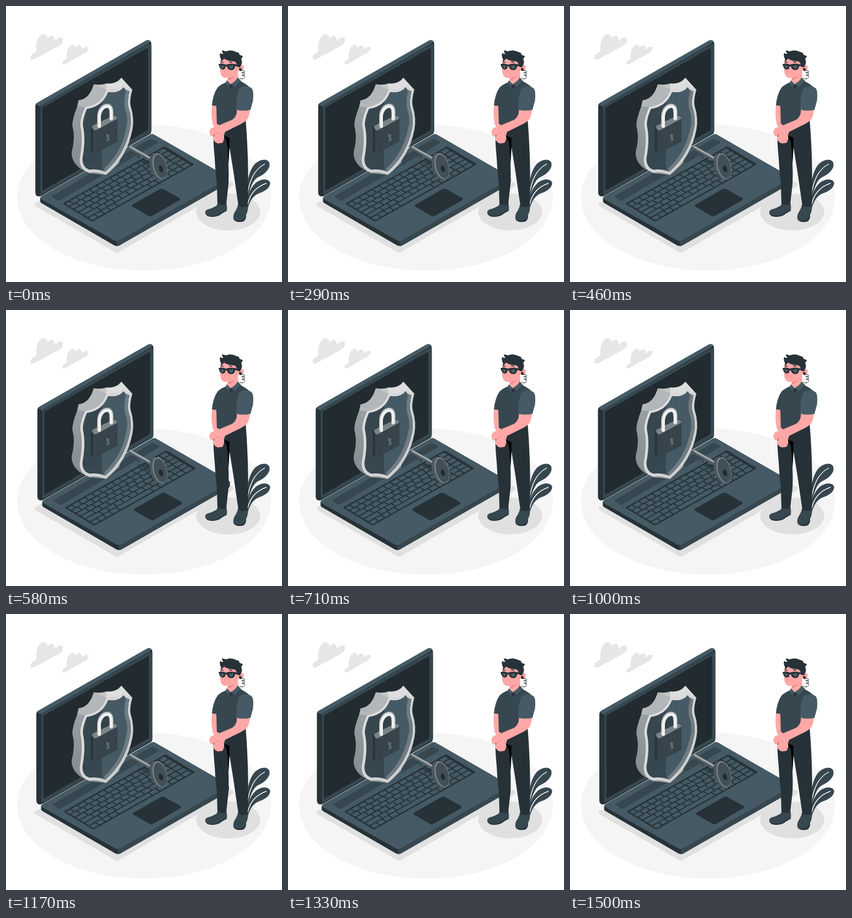
An HTML page that plays this animation: 500x500 px, repeating every 1540 ms.

```html
<!DOCTYPE html>
<html lang="en">
<head>
<meta charset="utf-8">
<title>Laptop security</title>
<style>
html, body { margin: 0; width: 100%; height: 100%; overflow: hidden; background: #fff; }
svg { display: block; width: 100vw; height: 100vh; }
</style>
</head>
<body>
<svg viewBox="0 0 500 500" xmlns="http://www.w3.org/2000/svg">
  <defs>
    <linearGradient id="side" x1="0" y1="0" x2="0" y2="1">
      <stop offset="0" stop-color="#a3a8ab"/><stop offset="1" stop-color="#83898c"/>
    </linearGradient>
    <linearGradient id="rim" x1="0" y1="0" x2="1" y2="1">
      <stop offset="0" stop-color="#e3e3e3"/><stop offset="1" stop-color="#c6c8c9"/>
    </linearGradient>
    <clipPath id="panel"><use href="#inner"/></clipPath>
  </defs>

  <ellipse cx="250" cy="347" rx="230" ry="132.500" fill="#f5f5f5"/>
  <g fill="#e6e6e6">
    <path d="M47 97C43 96 44 89 49 86C53 83 55 84 55 79C54 69 56 59 63 53C69 49 75 51 75 59C79 53 85 52 87 57C89 60 88 62 89 63C94 57 101 54 103 59C104 64 101 69 96 72L52 96Q49 98 47 97Z"/>
    <path d="M104 106C101 105 102 100 106 98C109 96 110 96 110 92C109 84 112 75 118 71C122 69 126 71 126 76C129 71 134 70 136 73C137 75 137 77 137 79C142 74 149 72 150 76C150 80 147 83 143 85L108 105Q106 106 104 106Z"/>
  </g>
  <path d="M53 357Q50 360 54 363L196 445Q201 448 206 445L410 327Q415 323 410 320L263 250Z" fill="#e0e0e0"/>
  <ellipse cx="402.500" cy="373" rx="58" ry="33.500" fill="#e0e0e0"/>

  <g id="laptop">
    <path d="M62 348V353Q62 356 66 358L196 433.500Q201 436 206 433.500L399 323Q402 321 402 318V311Z" fill="#263238"/>
    <path d="M201 425V435Q204 435 206 433.500L399 323Q402 321 402 318V311Z" fill="#37474f"/>
    <path d="M64 350Q60 347 65 344L261 233Q265 231 269 233.200L399 308Q404 311.500 399 314L205 424.500Q201 427 196 424.500Z" fill="#455a64"/>
    <path d="M82 345L93 352.500Q95 353.500 98 352L273 249Q276 247 273 245L262 240.500Z" fill="#37474f"/>
    <path d="M53.300 182Q53.300 177 57 175.200L253 63.200Q259 60 262.500 64.500Q263.500 66 263.500 69V226Q263.500 230 261 232L64 344Q59 346 56 344Q53.300 342 53.300 338Z" fill="#263238"/>
    <path d="M54.800 177.700Q55 176 57 175.200L253 63.200Q259 60 262.500 64.500L257.500 68.200L64 179.700Q62.500 180.500 62.500 183Z" fill="#455a64"/>
    <path d="M62.500 185Q62.500 181 66 179L257 70Q263 67 263.500 72V225Q263.500 228 261 230L66 341Q62.500 343 62.500 339Z" fill="#37474f"/>
    <path d="M66 187Q66 184 68 183L254.500 77Q257.500 75.500 257.500 79V221Q257.500 224 255 226L68 333.500Q66 334.500 66 332Z" fill="#222b30"/>
    <g id="keys" transform="matrix(.867 -.488 .85 .515 102.500 358)">
      <rect width="213" height="63.500" rx="2" fill="#263238"/>
    </g>
    <path d="M230 359.500L278 332Q282 330 286 332L314 347.500Q317 350 314 352L266 379.500Q262 382 258 380L230 364Q226 362 230 359.500Z" fill="#263238"/>
  </g>

  <!-- shield -->
  <path d="M129 182Q131 177 131.500 171Q151 169 159 142Q171 144 182 140.500Q200 142 209 130L228 151L205 285L181 306L151 303L134 294Q118 282 119 264Q126 238 120.500 219Q119 208 129 182Z" fill="url(#side)"/>
  <path d="M131.500 171Q151 169 159 142L182 151.500Q173 179 143.500 183L129 182Z" fill="#b3b7b9"/>
  <path d="M159 142Q171 144 182 140.500L205 149Q193 153 182 151.500Z" fill="#c4c7c8"/>
  <path d="M182 140.500Q200 142 209 130L228 151L214 146Q203 153 182 151.500Z" fill="#dedede"/>
  <path d="M143.500 183Q173 179 182 151.500Q203 155 213 141.500Q218 149 229 151Q223 172 226 182Q233 204 229 224Q219 275 181 306Q165 300 151 302Q133 297 133.500 277Q140 241 135 218Q133 207 143.500 183Z" fill="url(#rim)"/>
  <path id="inner" d="M146.500 186.500Q175 182 185 156Q204 159 213 147.500Q217 153 223.500 154.500Q219 173 222 185Q228.500 204 224.500 222Q215 270 180 300Q165 294.500 151 296.500Q138 292 138.500 276Q145 241 139.500 218Q138 206 146.500 186.500Z" fill="#37474f"/>
  <g clip-path="url(#panel)">
    <path d="M174 140H235V310H174Z" fill="#455a64"/>
    <path d="M213 145L217 156Q213 174 216 187Q222 205 218 221Q209 266 178 294V302H235V140Z" fill="#707c82"/>
  </g>

  <!-- padlock -->
  <path d="M163 222V201Q166 180 181 177L191 204L163 224Z" fill="#263238" opacity=".55"/>
  <path d="M153.500 219Q153 217 156 216L195 197L202 203V243Q202 245 200 246.500L159 267Q156 267 153.500 264Z" fill="#2a363c"/>
  <path d="M158 226L202 203V243Q202 245.500 200 246.500L161 267Q158 267.500 158 265Z" fill="#37444b"/>
  <path d="M155.500 219Q155.500 217 158 216L192 199.500Q195 198 198 199.500L201 201.500Q202.500 203.500 200 205L164 224.500Q161 226 158 224Z" fill="#7c8386"/>
  <path d="M168.500 217.500V200C169 187 177 180 184 180.500C189 181 191 186 191 192V204" fill="none" stroke="#bdbdbd" stroke-width="7" stroke-linecap="round"/>
  <path d="M169.300 218V200C170 188 178 181 185 182C189 183 190.500 187 190.500 192V204" fill="none" stroke="#f0f0f0" stroke-width="5.200" stroke-linecap="round"/>
  <path d="M181 235Q182 231 185 232Q188 234 186.500 237L188 243L182 246L183 239Q181 238 181 235Z" fill="#566a74"/>

  <!-- key and its shadow -->
  <path d="M238 280L246 284L262 293Q264 301 273 309Q282 318 288 313L290 302L264 279Z" fill="#263238" opacity=".6"/>
  <path d="M229 263L242 271V277L238 274V271L235 270V273L229 269Z" fill="#37474f"/>
  <path d="M222 255Q222 252.500 225 253L264 275V283L224 260Q222 258 222 255Z" fill="#4f5b61"/>
  <path d="M223 254.500Q224 252.500 227 254L266 276V280L225 257Z" fill="#a0a6a9"/>
  <g transform="rotate(-15 277 291)">
    <ellipse cx="273.500" cy="289" rx="12" ry="24" fill="#4c585e"/>
    <ellipse cx="279" cy="291" rx="12.500" ry="24" fill="#868e92"/>
    <ellipse cx="279.500" cy="291.500" rx="11.200" ry="22.500" fill="#414f56"/>
    <ellipse cx="279.500" cy="296" rx="3.600" ry="6.200" fill="#222b30"/>
  </g>

  <!-- plant -->
  <g fill="#37474f">
    <path d="M435 350C437 322 438 302 450 287C459 278 473 275 477 284C480 294 469 305 457 310C447 315 441 332 438 352Z"/>
    <path d="M435 368C437 343 443 328 454 319C464 312 476 313 478.500 320C479 329 469 336 459 339C448 343 441 353 437 371Z"/>
  </g>
  <g fill="none" stroke="#fff" stroke-width="1.400">
    <path d="M437 343C441 318 448 297 469 286"/>
    <path d="M437 362C441 344 449 329 472 321"/>
  </g>

  <!-- guard -->
  <g>
    <path d="M384 357L381 362Q373 367 364 369Q359 372 362 377Q367 382 380 381Q388 379 391 374L400 370Q401 364 399 356Z" fill="#37474f"/>
    <path d="M361 374Q362 379 370 380Q384 381 391 373L400 369V371L391 376Q385 382 372 382Q361 381 361 374Z" fill="#263238"/>
    <path d="M420 360Q419 367 414 374Q410 382 413 388Q419 393 429 390Q434 387 435 378Q439 372 438 360Z" fill="#37474f"/>
    <path d="M412 384Q413 389 420 389Q433 389 434 379L435 380Q435 389 428 391Q414 393 412 384Z" fill="#263238"/>
    <path d="M376 225Q375 245 378 275Q379 299 382 323L383 358Q391 362 399 359L403 323Q404 305 403 285L404 250L412 300L421 362Q429 366 438 362C440 310 438 250 434 205L383 211Z" fill="#263238"/>
    <path d="M393 234L405 239Q404 247 405 255L403 286Q402 256 399 243Z" fill="#000"/>

    <path d="M375 174Q370 189 374 212Q376 220 383 223L386 214Q382 203 385 178Z" fill="#ffa8a7"/>
    <path d="M383 148Q390 141 400 138L421 134Q441 144 444 151L441 178L434 209Q408 219 382 214L381 181L373 180Q375 160 383 148Z" fill="#37474f"/>
    <path d="M418 185Q420 199 410 206L379 219Q369 220 369 227Q367 232 372 236L378 233L375 240Q377 247 384 249L392 248Q396 243 395 234L397 228L419 217Q433 211 438 204Q442 196 442 183Z" fill="#ffa8a7"/>
    <path d="M374 236L380 231L388 230M394 235L391 231" fill="none" stroke="#f28f8f" stroke-width="1"/>
    <path d="M424 148Q438 142 446 150Q449 156 447.500 171L443 188Q431 191 417 188Q417 157 424 148Z" fill="#455a64"/>

    <path d="M402 122L401 137Q403 144 408 143Q416 140 421 133L420 114Z" fill="#ffa8a7"/>
    <path d="M402 130Q410 129 415 124Q411 133 402 135Z" fill="#f28f8f"/>
    <path d="M400 135L398 141L403 148L408 142L415 147L425 135L420 130Q416 137 407 142Z" fill="#455a64" stroke="#2f3d44" stroke-width=".6"/>
    <path d="M404 144L408 142L411 146L407 149Z" fill="#263238"/>

    <g transform="translate(0 -.7)">
      <path d="M389 96Q386 113 389 124Q391 130 397 131Q406 132 415 126Q421 121 422 115Q425 121 429 117Q433 111 429 108Q425 107 423 110L421 95Z" fill="#ffa8a7"/>
      <path d="M390 98Q386 91 388 86Q391 88 394 87Q390 84 392 81Q395 82 398 83Q408 79 417 84Q423 85 423 89Q429 91 428 94L425 95Q430 101 425 110Q422 114 419 110Q418 104 414 101Q402 101 395 96Q392 99 389 104Q389 100 390 98Z" fill="#263238"/>
      <path d="M422 91Q428 93 429 90Q429 97 422 97Z" fill="#263238"/>
      <path d="M390 104L394 102M404 102L410 103" stroke="#263238" stroke-width="1.400"/>
      <path d="M385 106Q391 104 399 107Q406 104 415 106L423 108V110L415 110Q414 117 408 117Q402 117 400 110L398 110Q397 116 392 116Q387 115 385 106Z" fill="#263238"/>
      <path d="M388 108L396 109Q394 114 391 114ZM403 109L412 108Q412 115 407 115Z" fill="#475b65"/>
      <path d="M397 114L395 120L398 121M401 124L404 123.500" fill="none" stroke="#f28f8f" stroke-width="1"/>
    </g>
    <ellipse cx="424.500" cy="115" rx="2.500" ry="2.800" fill="#263238"/>
    <path d="M426 117Q433 116 432 120Q429 123 427 121Q428 118 432 122Q433 127 428 126Q426 124 431 125Q434 129 429 132Q426 133 423 130" fill="none" stroke="#263238" stroke-width="1"/>
  </g>
</svg>
<script>
const NS = "http://www.w3.org/2000/svg";
const laptop = document.getElementById("laptop");
const keys = document.getElementById("keys");

function addKey(x, y, w, h) {
  const key = document.createElementNS(NS, "rect");
  const box = { x, y, width: w, height: h, rx: 0.8, fill: "#455a64" };
  for (const name in box) key.setAttribute(name, box[name]);
  keys.append(key);
}

// Five staggered rows: width of the first key, count of the rest.
const rows = [[10, 14], [13, 14], [19, 13], [22, 12], [28, 12]];
rows.forEach(([first, count], r) => {
  const y = 3 + r * 10;
  const pitch = (207 - first) / count;
  addKey(3, y, first - 2.2, 7.8);
  for (let i = 0; i < count; i++) addKey(3 + first + i * pitch, y, pitch - 2.2, 7.8);
});
[13, 13, 13, 15, 70, 15, 13, 13, 13, 13, 16].reduce((x, w) => {
  addKey(x, 53, w - 2.2, 7.8);
  return x + w;
}, 3);

// Horizontal shake, drawn at 24 steps a second.
const LOOP = 1540, STEP = 1000 / 24, PERIOD = 1500, LEAD = 25;
const shake = [0, -1, 2, -4, 4, -4, 4, -4, 2, -1, 0];

function offset(ms) {
  const p = (ms % PERIOD) / PERIOD * 10;
  const i = Math.floor(p);
  return shake[i] + (shake[i + 1] - shake[i]) * (p - i);
}

function draw(now) {
  const step = Math.floor((now % LOOP + 4.5) / STEP) % 37;
  laptop.setAttribute("transform", `translate(${offset(step * STEP + LEAD).toFixed(3)} 0)`);
}

const start = performance.now();
function tick() {
  draw(performance.now() - start);
  requestAnimationFrame(tick);
}
tick();
</script>
</body>
</html>
```
